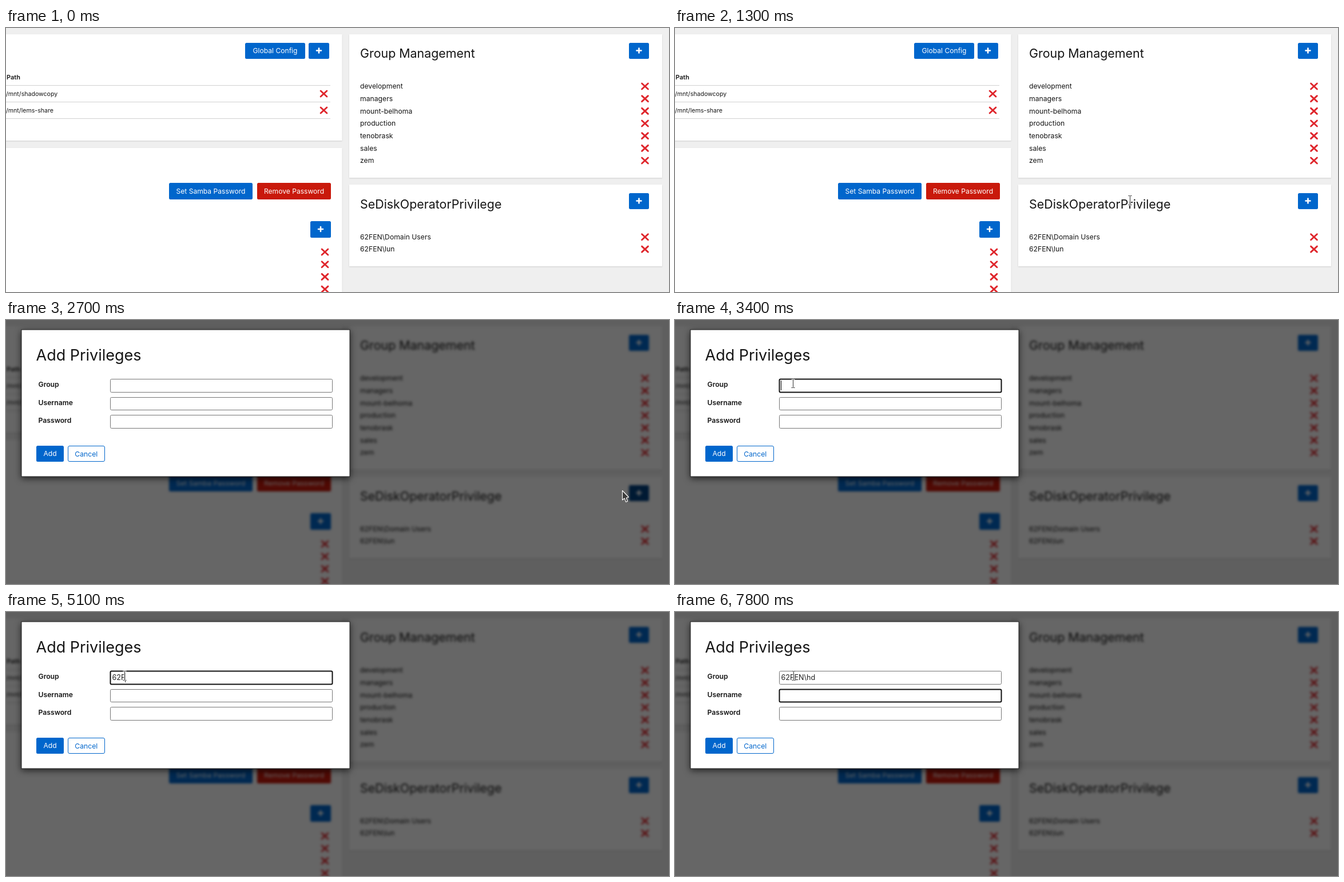
Animation of 1159x462 px, one loop 8 s. Source, as an HTML page:

```html
<!DOCTYPE html>
<html lang="en">
<head>
<meta charset="utf-8">
<title>Add Privileges</title>
<style>
  html, body { margin: 0; width: 100%; height: 100%; overflow: hidden; background: #efefef; }
  svg { display: block; width: 100vw; height: 100vh; }
  text { font-family: Inter, "Open Sans", sans-serif; font-optical-sizing: none; white-space: pre; }
  .panel { fill: #fff; filter: drop-shadow(0 1px 1px rgba(3, 3, 3, .13)); }
  .modal { fill: #fff; stroke: #222; stroke-width: 1; filter: drop-shadow(0 3px 6px rgba(0, 0, 0, .65)); }
  .blur { filter: blur(2px); }
</style>
</head>
<body>
<svg id="stage" viewBox="0 0 1159 462" xmlns="http://www.w3.org/2000/svg"></svg>
<script>
const LOOP = 8000;
const BLUE = '#0066cc', DARK_BLUE = '#004080', RED = '#c9190b', INK = '#151515';
const ENTRY = '62FEN\\hd';
const TYPED = [[4600, 1], [4800, 2], [5100, 3], [5300, 4], [5500, 5], [6000, 6], [6900, 8]];

const rect = (x, y, w, h, fill, extra = '') =>
  `<rect x="${x}" y="${y}" width="${w}" height="${h}" fill="${fill}" ${extra}/>`;
const panel = (x, y, w, h) => rect(x, y, w, h, '#fff', 'class="panel"');
const label = (x, y, str, size = 12.2, fill = INK, extra = '') =>
  `<text x="${x}" y="${y}" font-size="${size}" fill="${fill}" ${extra}>${str}</text>`;
const button = (x, y, w, h, str, fill = BLUE) =>
  rect(x, y, w, h, fill, 'rx="2.5"') +
  label(x + w / 2, y + h / 2 + 4.2, str, 12.1, '#fff', 'text-anchor="middle"');
const plus = (x, y, w, h, id = '') =>
  rect(x, y, w, h, BLUE, `rx="2.5" ${id && `id="${id}"`}`) +
  `<path d="M${x + w / 2 - 4} ${y + h / 2 - .5}h8m-4-4v8" stroke="#fff" stroke-width="2.6" stroke-linecap="round"/>`;
const cross = (x, y) =>
  `<path d="M${x - 5.4} ${y - 5}l10.8 10m0-10l-10.8 10" stroke="#df262c" stroke-width="2.9" stroke-linecap="round"/>`;
const rule = y => rect(0, y, 567, 1, '#d2d2d2');
const listRow = (str, y) => label(619, y, str) + cross(1117, y - 4.2);
const field = (id, y, h) =>
  `<rect id="${id}" x="182.5" y="${y + .5}" width="388" height="${h - 1}" rx="2" fill="#fff"/>`;
const bold = 'font-weight="600"';

const groups = ['development', 'managers', 'mount-belhoma', 'production', 'tenobrask', 'sales', 'zem'];

const page = `<g id="page">
  ${rect(-30, -30, 1219, 522, '#efefef')}
  ${panel(-30, 11, 617.5, 186)}${panel(-30, 210, 617.5, 290)}
  ${panel(600, 11, 547, 251)}${panel(600, 274, 547, 143)}
  ${button(418, 26, 105, 28, 'Global Config')}${plus(529, 26, 36, 28)}
  ${label(1, 90, 'Path', 11, INK, bold)}
  ${label(0, 119, '/mnt/shadowcopy', 10.6)}${label(0, 148, '/mnt/lems-share', 10.6)}
  ${[100, 129, 158].map(rule).join('')}
  ${cross(555.5, 115)}${cross(555.5, 144)}
  ${button(285, 271, 146, 29, 'Set Samba Password')}
  ${button(439, 271, 129, 29, 'Remove Password', RED)}
  ${plus(532, 338, 36, 29)}
  ${[0, 1, 2, 3].map(i => cross(557.5, 392 + 21.7 * i)).join('')}
  ${label(619, 52, 'Group Management', 21.4)}${plus(1089, 26, 35, 28)}
  ${groups.map((name, i) => listRow(name, 106.2 + 21.67 * i)).join('')}
  ${label(619, 316, 'SeDiskOperatorPrivilege', 21.4)}${plus(1089, 289, 35, 28, 'add')}
  ${rect(619, 354, 508, 22, '#cbe0f4', 'id="selection"')}
  ${listRow('62FEN\\Domain Users', 370)}${listRow('62FEN\\lun', 391.3)}
</g>`;

const dialog = `<g id="dialog">
  ${rect(0, 0, 1159, 462, '#000', 'opacity=".6"')}
  ${rect(27, 17, 574, 257, '#fff', 'class="modal"')}
  ${label(52.5, 71, 'Add Privileges', 27)}
  ${['Group', 'Username', 'Password'].map((s, i) => label(56.5, 117 + 31.5 * i, s, 12.2, INK, bold)).join('')}
  ${field('group', 103, 24)}${field('user', 135, 23)}${field('pass', 166, 24)}
  ${label(185.5, 119, '', 12.6, '#222', 'id="entry"')}
  ${rect(185, 106, 1, 17, '#000', 'id="caret"')}
  ${button(53, 220, 48, 28, 'Add')}
  ${rect(108.5, 220.5, 64, 27, '#fff', `rx="2.5" stroke="${BLUE}"`)}
  ${label(140.3, 239, 'Cancel', 12.2, BLUE, 'text-anchor="middle"')}
</g>`;

const beamPath = 'M-3-8H-1Q0-8 0-7V7Q0 8-1 8H-3M3-8H1Q0-8 0-7M0 7Q0 8 1 8H3';
const cursors = `<g id="arrow"><path d="M.5 .5V17L4.2 14 6.6 20.4 9.6 19.2 7.4 13.2 11.5 12Z"
    fill="#3b3b3b" stroke="#fff" stroke-width="1.1" stroke-linejoin="round"/></g>
  <g id="beam" fill="none"><path d="${beamPath}" stroke="#fff" stroke-width="2.6"/>
    <path d="${beamPath}" stroke="#333" stroke-width="1"/></g>`;

const stage = document.getElementById('stage');
stage.innerHTML = page + dialog + cursors;
const el = {};
stage.querySelectorAll('[id]').forEach(node => el[node.id] = node);

const show = (node, on) => node.setAttribute('display', on ? 'inline' : 'none');
const mix = (a, b, k) => a + (b - a) * k;
const smooth = k => k * k * (3 - 2 * k);
const clamp = k => Math.min(1, Math.max(0, k));
const within = (t, a, b) => t >= a && t < b;

function pointer(t) {
  if (t < 600) return null;
  if (t < 1100) {
    const [x, y] = [[591, 414], [631, 353], [650, 317], [656, 303]][Math.min(3, (t - 600) / 100)];
    return { x, y, beam: t >= 700 };
  }
  if (t < 2300) {
    const k = smooth(clamp((t - 1000) / 800));
    const x = mix(656, 1095.5, k);
    return { x, y: mix(303, 297, k), beam: x < 866 };
  }
  if (t < 2700) return { x: 1104, y: 297, beam: false };
  if (t >= 3700) return { x: 207, y: 111, beam: true };
  const k = smooth(clamp((t - 2700) / 600));
  return { x: mix(1077, 206, k), y: mix(298, 110, k), beam: t >= 3300 };
}

function focusRing(node, on) {
  node.setAttribute('stroke', on ? '#101010' : '#767676');
  node.setAttribute('stroke-width', on ? 2 : 1);
}

function draw(time) {
  const t = Math.floor(time / 100) * 100;
  const open = t >= 2700;
  show(el.dialog, open);
  el.page.setAttribute('class', open ? 'blur' : '');
  show(el.selection, within(t, 700, 900));
  el.add.setAttribute('fill', within(t, 1800, 2800) ? DARK_BLUE : BLUE);

  const inUser = t >= 7200;
  focusRing(el.group, within(t, 3400, 7200));
  focusRing(el.user, inUser);
  focusRing(el.pass, false);

  const count = TYPED.reduce((n, [at, len]) => t >= at ? len : n, 0);
  el.entry.textContent = ENTRY.slice(0, count);
  const width = count && open && !inUser ? el.entry.getComputedTextLength() : 0;
  el.caret.setAttribute('x', Math.round(185 + width));
  el.caret.setAttribute('y', inUser ? 138 : 106);
  show(el.caret, within(t, 3400, 4000) || within(t, 4600, 6600) || within(t, 6900, 7800));

  const p = pointer(t);
  show(el.arrow, p && !p.beam);
  show(el.beam, p && p.beam);
  if (p) {
    const dx = p.beam ? Math.round(p.x) + .5 : Math.round(p.x);
    const dy = p.beam ? Math.round(p.y) + .5 : Math.round(p.y);
    (p.beam ? el.beam : el.arrow).setAttribute('transform', `translate(${dx} ${dy})`);
  }
}

const start = performance.now();
function tick() {
  draw((performance.now() - start) % LOOP);
  requestAnimationFrame(tick);
}
tick();
</script>
</body>
</html>
```
